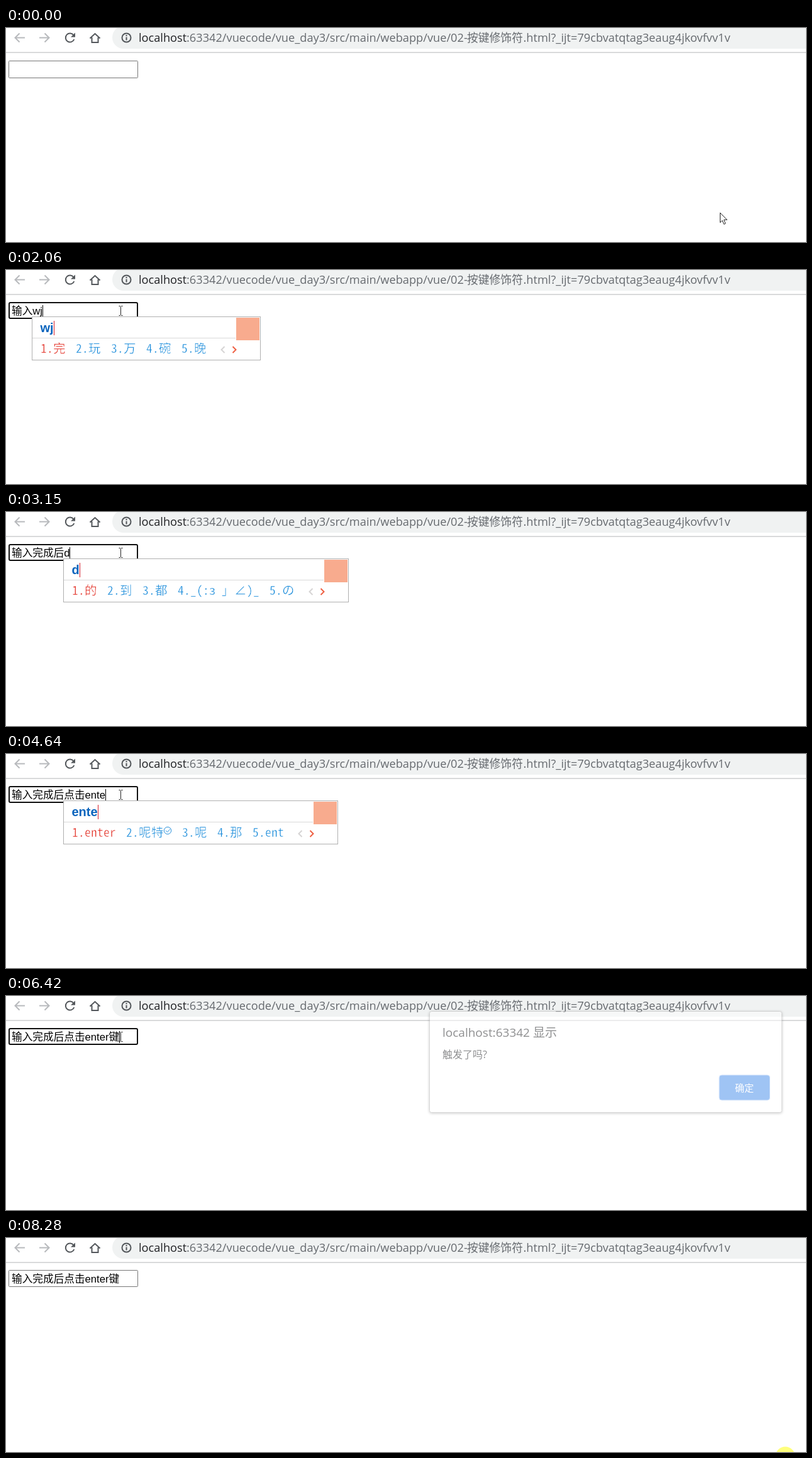
These frames come from a looping animation (1272x341 px, 8.35 s). An HTML page:

```html
<!DOCTYPE html>
<html lang="zh-CN">
<head>
<meta charset="utf-8">
<style>
html, body { margin: 0; width: 100%; height: 100%; overflow: hidden; background: #fff; }
svg { display: block; }
text { white-space: pre; }
.ui { font-family: "Open Sans", "Noto Sans CJK SC", sans-serif; }
.typed { font: 16.67px "Liberation Sans", "Noto Sans CJK SC", sans-serif; }
.label { font: bold 20px "Liberation Sans", sans-serif; fill: #0a64bd; }
/* the white outline thins the strokes of the candidates */
.words {
  font: 300 19.5px "Noto Sans Mono CJK SC", "Noto Sans CJK SC", monospace;
  fill: #0b84d8; stroke: #fff; stroke-width: .5;
}
.words :first-child { fill: #e01f14; }
.line { fill: none; stroke-width: 2; }
</style>
</head>
<body>
<svg width="1272" height="341">
  <!-- browser bar -->
  <rect x="169" y="-3" width="1200" height="36" rx="18" fill="#f0f2f2"/>
  <rect y="38" width="1272" height="2" fill="#d9dadb"/>
  <g class="line" stroke="#b8babd">
    <path d="M30 15.5H15M21.5 8.5L14.5 15.5L21.5 22.5"/>
    <path d="M53 15.5H68M61.5 8.5L68.5 15.5L61.5 22.5"/>
  </g>
  <g class="line" stroke="#53575b">
    <path d="M107.5 11.5A7 7 0 1 0 108.3 18"/>
    <path d="M110 7.5V14.5H103Z" fill="#53575b" stroke="none"/>
    <path d="M133.5 16.5L141.5 9L149.5 16.5M136.5 15V23H146.5V15"/>
    <circle cx="191.5" cy="15.5" r="7"/>
    <path d="M191.5 14.5V19.5M191.5 11V13"/>
  </g>
  <g class="ui" font-size="18.2" fill="#666a6f">
    <text x="211" y="22" fill="#202124">localhost</text>
    <text x="287" y="22">:63342/vuecode/vue_day3/src/main/webapp/vue/02-</text>
    <text x="733" y="22" font-size="17.8">按键修饰符</text>
    <text x="822.5" y="22">.html?_ijt=79cbvatqtag3eaug4jkovfvv1v</text>
  </g>

  <g id="field">
    <rect id="border" fill="#fff"/>
    <text id="typed" class="typed" x="9" y="71"></text>
    <rect id="caret" y="56" width="1" height="19"/>
  </g>

  <g id="popup">
    <rect id="frame" x=".5" y="74.5" height="69" fill="#fff" stroke="#b0b0b0"/>
    <path id="rule" stroke="#d9d9d9"/>
    <text id="label" class="label" x="13.5" y="99"></text>
    <rect id="labelCaret" y="81" width="1" height="23" fill="#d8202c"/>
    <text id="words" class="words" y="132"></text>
    <g id="check" fill="none" stroke="#2d93dc"><circle r="5.7"/><path d="M-3 0L-.5 2.5L4 -2.5"/></g>
    <g id="tail">
      <path class="line" d="M-57.5 122L-62.5 127L-57.5 132" stroke="#d6d4d4"/>
      <path class="line" d="M-44.5 122L-39.5 127L-44.5 132" stroke="#ee5f42"/>
      <rect x="-39" y="76" width="37" height="36" fill="#f8ab8e"/>
    </g>
  </g>

  <g id="dialog" class="ui">
    <rect x="673.5" y="34.5" width="560" height="161" rx="3" fill="#fff" stroke="#b4b4b4"
      style="filter: drop-shadow(0 1px 2px #0006)"/>
    <text x="694" y="75" font-size="19" fill="#202124">localhost:63342 显示</text>
    <text x="694" y="109" font-size="16" fill="#202124">触发了吗?</text>
    <rect x="1134" y="136" width="80.5" height="40" rx="4" fill="#428aeb" stroke="#a9caf8"/>
    <text x="1159" y="162" font-size="15" font-weight="500" fill="#fff">确定</text>
  </g>

  <g id="pointer">
    <circle id="click" r="15.5" fill="#ffff7d" style="mix-blend-mode: multiply"/>
    <path id="arrow" d="M.5 .5V16L4 12.7L6.5 18.7L9 17.6L6.5 11.7H11.5Z" fill="#fff" stroke="#222"/>
    <path id="beam" d="M-2.5 -7.5H-.5L.5 -6.5L1.5 -7.5H3.5M.5 -6.5V6.5M-2.5 7.5H-.5L.5 6.5L1.5 7.5H3.5"
      fill="none" stroke="#222"/>
  </g>
</svg>
<script>
const LOOP = 8350;
const $ = id => document.getElementById(id);
const set = (id, attrs) => {
  for (const name in attrs) $(id).setAttribute(name, attrs[name]);
};
const show = (id, on) => $(id).style.display = on ? '' : 'none';

// time, committed text, letters being composed, popup x, candidates
const DONE = '输入完成后', CLICK = DONE + '点击', ENTER = CLICK + 'enter';
const steps = [
  [0, ''],
  [520, ''],
  [1220, '', 's', 9, '是 上 说 时 水'],
  [1300, '', 'sh', 9, '是 上 说 时 水'],
  [1450, '', 'shr', 9, '输入 收入 生日 商人 胜任'],
  [1680, '输入'],
  [1910, '输入', 'w', 41, '我 为 无 问 玩'],
  [2060, '输入', 'wj', 41, '完 玩 万 碗 晚'],
  [2140, '输入', 'w', 41, '我 为 无 问 玩'],
  [2220, '输入', 'wc', 41, '完成 外出 晚餐 外传 无常'],
  [2450, '输入完成'],
  [2600, '输入完成', 'h', 75, '好 和 哈哈哈哈 还 会'],
  [2750, '输入完成', 'hou', 75, '后 候 厚 吼 猴'],
  [3000, DONE],
  [3150, DONE, 'd', 91, '的 到 都 _(:з」∠)_ の'],
  [4090, CLICK, 'e', 91, '额 呃 饿 恶 鹅'],
  [4180, CLICK, 'en', 91, 'enter 嗯 恩 摁 en'],
  [4340, CLICK, 'ent', 91, 'enter 恩 嫩 ent 呢'],
  [4640, CLICK, 'ente', 91, 'enter 呢特✓ 呢 那 ent'],
  [4720, CLICK, 'enter', 91, 'enter 能 嫩 恩'],
  [5100, ENTER],
  [5490, ENTER, 'j', 164, '就 将 及 家 叫'],
  [5640, ENTER, 'jm', 164, '键 件 减 见 一'],
  [5960, ENTER + '键'],
];

// time, x, y of the mouse
const track = [
  [0, 1135, 294], [60, 1135, 294], [520, 182, 65], [6830, 182, 65], [7200, 1228, 152],
  [7420, 1216, 140], [7500, 1216, 140], [7650, 1204, 152], [7730, 1204, 152],
  [8110, 1230, 342], [8280, 1240, 348], [LOOP, 1240, 348],
];

function mouseAt(t) {
  const i = Math.max(1, track.findIndex(p => p[0] > t));
  const [t0, x0, y0] = track[i - 1], [t1, x1, y1] = track[i];
  const p = (t - t0) / (t1 - t0), k = p * p * (3 - 2 * p);
  return [x0 + (x1 - x0) * k, y0 + (y1 - y0) * k].map(Math.round);
}

// Candidates sit on a grid: 10 px for a Latin letter, 20 px for a wide one.
function drawPopup(letters, left, list) {
  let x = 14, markup = '';
  show('check', list.includes('✓'));
  list.split(' ').forEach((word, i) => {
    const places = [];
    for (const c of `${i + 1}.${word}`) {
      if (c === '✓') set('check', { transform: `translate(${x + 6} 122)` });
      else places.push(x);
      x += c === '✓' ? 13 : c < '\x7f' ? 10 : 20;
    }
    markup += `<tspan x="${places.join(' ')}">${i + 1}.${word.replace('✓', '')}</tspan>`;
    x += 16;
  });
  const width = x + 70;
  $('words').innerHTML = markup;
  $('label').textContent = letters;
  set('labelCaret', { x: Math.round(13.5 + $('label').getComputedTextLength()) });
  set('popup', { transform: `translate(${left} 0)` });
  set('frame', { width: width - 1 });
  set('rule', { d: `M1 108.5H${width - 40}` });
  set('tail', { transform: `translate(${width} 0)` });
}

let current;
function applyStep(step) {
  if (step === current) return;
  current = step;
  const [time, text, letters = '', left, list] = step;
  $('typed').textContent = text + letters;
  set('caret', { x: Math.floor(9 + $('typed').getComputedTextLength()) });
  set('field', { transform: `translate(0 ${time < 1680 ? 1 : 0})` });
  show('popup', true);
  if (list) drawPopup(letters, left, list);
}

const between = (t, a, b) => t >= a && t < b;
const stepped = (t, start, count) => Math.min(1, Math.max(0, Math.floor((t - start) / 77 + 1) / count));

function render(t) {
  const step = steps.findLast(s => s[0] <= t);
  applyStep(step);

  const focused = between(t, 520, 8280), tall = t < 1680 ? 1 : 0;
  set('border', focused
    ? { x: 5, y: 52, width: 204, height: 25 + tall, rx: 2, stroke: '#101010', 'stroke-width': 2 }
    : { x: 4.5, y: 51.5, width: 205, height: 26 + tall, rx: 1, stroke: '#767676', 'stroke-width': 1 });
  show('caret', focused && (t > 6270 || Math.floor((t - step[0]) / 530) % 2 === 0));

  const closing = between(t, 5100, 5260);
  show('popup', step[4] || closing);
  $('popup').style.opacity = closing ? 1 - stepped(t, 5100, 3) : 1;

  const open = stepped(t, 6270, 4) - stepped(t, 7730, 4);
  show('dialog', open > 0);
  $('dialog').style.opacity = open;
  set('dialog', { transform: `translate(0 ${-20 * (1 - open)})` });

  const [x, y] = mouseAt(Math.floor((t + 5) / 75) * 75);
  const typing = between(t, 520, 6870);
  set('pointer', { transform: `translate(${x} ${y})` });
  show('beam', typing);
  show('arrow', !typing);
  show('click', between(t, 520, 590) || between(t, 7650, 7730) || t >= 8280);
}

function tick() {
  render(performance.now() % LOOP);
  requestAnimationFrame(tick);
}
tick();
</script>
</body>
</html>
```
